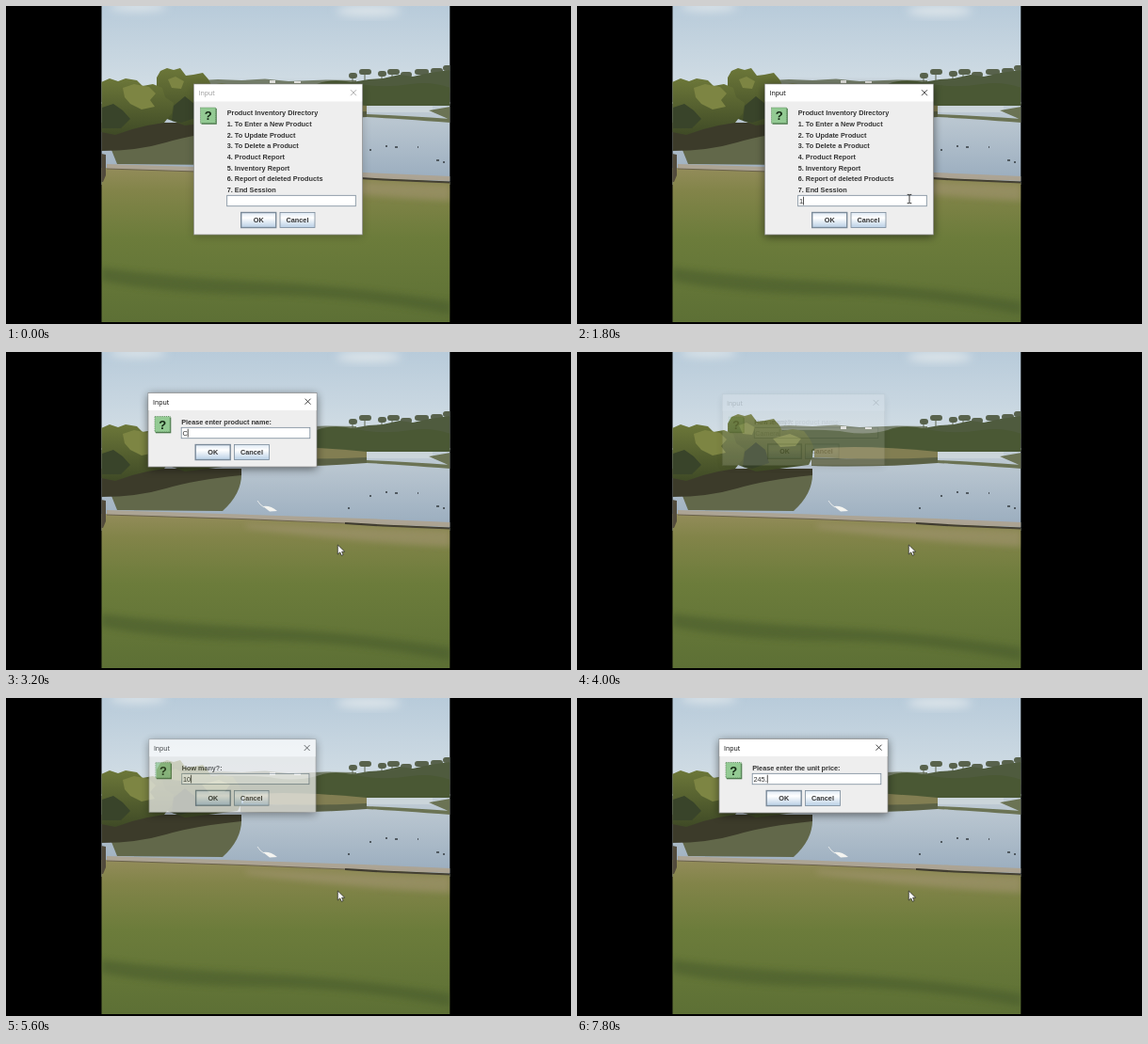
An HTML page that plays this animation: 600 px wide and 338 px high, repeating every 8 s.

```html
<!DOCTYPE html>
<html lang="en">
<head>
<meta charset="utf-8">
<title>Product inventory</title>
<style>
  html, body { margin: 0; width: 100%; height: 100%; overflow: hidden; background: #000; }
  svg { display: block; width: 100%; height: 100%; }
  text { font: bold 7.3px "Liberation Sans", Arial, sans-serif; fill: #333; white-space: pre; }
  text.title { font: 7px "Open Sans", "Noto Sans", sans-serif; fill: #000; }
  text.entry { font: 7.4px "Liberation Sans", Arial, sans-serif; }
  text.mark { font-size: 13px; fill: #142814; }
  .mid { text-anchor: middle; }
  .idle .title { fill: #999; }
  .idle .close { stroke: #999; }
  .idle .shadow { opacity: .22; }
  .close { fill: none; stroke: #111; stroke-width: .8; }
  .shadow { opacity: .55; }
</style>
</head>
<body>
<svg viewBox="0 0 600 338">
  <defs>
    <linearGradient id="sky" x2="0" y2="1">
      <stop stop-color="#b8cbda"/><stop offset=".8" stop-color="#d0dce4"/>
    </linearGradient>
    <linearGradient id="water" x2="0" y2="1">
      <stop stop-color="#c3ced6"/><stop offset="1" stop-color="#98abbd"/>
    </linearGradient>
    <linearGradient id="lawn" x2="0" y2="1">
      <stop stop-color="#938c5a"/><stop offset=".15" stop-color="#828449"/>
      <stop offset=".45" stop-color="#6c7c3b"/><stop offset="1" stop-color="#5d7035"/>
    </linearGradient>
    <linearGradient id="bush" x2="0" y2="1">
      <stop stop-color="#6c7739"/><stop offset="1" stop-color="#3f4a26"/>
    </linearGradient>
    <linearGradient id="metal" x2="0" y2="1">
      <stop stop-color="#dde8f3"/><stop offset=".35" stop-color="#fff"/><stop offset="1" stop-color="#b8cfe5"/>
    </linearGradient>
    <filter id="soft" x="-30%" y="-30%" width="160%" height="160%"><feGaussianBlur stdDeviation="5"/></filter>
    <filter id="blur" x="-10%" y="-30%" width="120%" height="160%"><feGaussianBlur stdDeviation="3"/></filter>
    <clipPath id="frame"><path d="M101.5 0H471.3V336H101.5Z"/></clipPath>
  </defs>
  <g clip-path="url(#frame)">
    <path fill="url(#sky)" d="M101 0H472V104H101Z"/>
    <g fill="#dce4e9" filter="url(#soft)">
      <ellipse cx="385" cy="5" rx="34" ry="6"/><ellipse cx="140" cy="1" rx="30" ry="5"/>
    </g>
    <path fill="url(#water)" d="M101 102H472V190H101Z"/>
    <!-- far shore and palms -->
    <path fill="#77816c" d="M190 80L225 78 250 79 275 77.5 300 80 340 78.5 372 79V90H190Z"/>
    <path fill="#e6e6e1" d="M280 79h6v3h-6ZM306 80h7v2h-7Z"/>
    <path fill="none" stroke="#5c6551" stroke-width="1" d="M368 73V82M381 69V82M399 72V82M410 68V82"/>
    <path fill="none" stroke="#58624c" stroke-width="6" stroke-linecap="round"
      d="M367 74h3M378 70h7M398 72h3M408 70h7M422 73h6M437 70h9M454 69h7M467 66h4"/>
    <path fill="#4f5b3e" d="M362 82L385 78 400 77 418 73 432 75 450 71 472 68V92H362Z"/>
    <path fill="#4a5834" d="M190 84Q262 81 285 85T330 83Q347 76 372 82T430 83Q452 80 472 87V106H330L190 104Z"/>
    <path fill="#cbd5da" d="M383 106H453V113H383Z"/>
    <path fill="#827e52" d="M252 103Q300 98 383 106V114Q320 116 252 112Z"/>
    <path fill="#5b6145" d="M249 112Q320 115 383 112V118Q320 123 249 121Z"/>
    <path fill="#6b7354" d="M383 115Q430 117 472 120V124Q420 120 383 118ZM449 111L472 107V121Z"/>
    <!-- left thicket and its reflection -->
    <path fill="#62684a" d="M112 153L250 128Q251 150 230 169L118 168Z"/>
    <path fill="#3c3b2a" d="M101 124H250V131Q200 136 170 145T101 154Z"/>
    <path fill="url(#bush)" d="M160 76L164 69 171 66 178 68 185 66 191 74 199 73 209 71 215 78 218 84 229 82 241 84 247 92 251 100 250 112 246 120 215 124 190 127 160 116Z"/>
    <path fill="url(#bush)" d="M101 81L110 77 119 80 127 77 139 79 145 85 156 83 166 87 169 97 178 103 176 114 168 124 150 127 134 131 116 137 101 134Z"/>
    <path fill="#7d8543" d="M124 87L136 83 152 86 159 93 153 100 158 107 144 110 132 104 126 97ZM172 78L180 75 189 80 186 88 176 87ZM208 92L226 87 238 92 232 100 216 101Z"/>
    <path fill="#39442a" d="M102 108L114 104 124 111 132 120 122 130 102 130ZM178 106L190 96 200 104 204 118 186 124 176 122Z"/>
    <!-- sea wall and lawn -->
    <path fill="url(#lawn)" d="M101 172L250 176 380 182 472 187V336H101Z"/>
    <path fill="#aca494" d="M107 168L260 173 380 177 472 181V186L380 183 260 178 107 173Z"/>
    <path fill="none" stroke="#69614b" d="M107 173L250 177.5 360 182"/>
    <path fill="none" stroke="#38352b" stroke-width="2" d="M360 182L400 184.5 472 187.5"/>
    <path fill="#a19471" opacity=".6" filter="url(#blur)" d="M255 183L472 190V207Q380 203 255 187Z"/>
    <path fill="#44582a" opacity=".5" filter="url(#blur)" d="M101 278Q180 289 270 293T472 314V328Q370 308 270 307T101 292Z"/>
    <path fill="#524b3c" d="M101 157L106 158V180L103 187H101Z"/>
    <!-- birds -->
    <path fill="none" stroke="#f4f4f0" stroke-width=".8" d="M267 158L270 162 274 165"/>
    <path fill="#f4f4f0" d="M273 164Q281 163 288 169L280 169.5Z"/>
    <path fill="none" stroke="#343b40" stroke-width="1.6" d="M403 149h2M413 150h3M386 153h2M457 164h3M464 166h2M363 166h2M437 150h1"/>
  </g>
  <g id="dialogs"></g>
  <g id="arrow"><path fill="#fff" stroke="#222" stroke-width=".7" d="M0 0V10L2.4 7.8 4 11.3 5.8 10.5 4.3 7.2H7.4Z"/></g>
  <g id="beam"><path fill="none" stroke="#222" stroke-width=".9" d="M-2.3 -4.6H-.5L0 -4 .5 -4.6H2.3M0 -4V4M-2.3 4.6H-.5L0 4 .5 4.6H2.3"/></g>
</svg>
<script>
const LOOP = 8000, STEP = 100;
const OPEN_DELAY = 120, OPEN_TIME = 250, CLOSE_TIME = 150;
const find = id => document.getElementById(id);
const clamp = v => Math.max(0, Math.min(1, v));

const menu = ["Product Inventory Directory", "1. To Enter a New Product", "2. To Update Product",
  "3. To Delete a Product", "4. Product Report", "5. Inventory Report",
  "6. Report of deleted Products", "7. End Session"];

// start: when the previous window begins to leave; blink: first caret; keys: times of typed letters
const dialogs = [
  { x: 199.5, y: 83, lines: menu, start: -1000, end: 2060, blink: 1200, entry: "1", keys: [1800] },
  { x: 151, y: 43.5, lines: ["Please enter product name:"], start: 2060, end: 3860, blink: 2200,
    entry: "Camera", keys: [3200, 3300, 3400, 3600, 3700, 3800] },
  { x: 151, y: 43.5, lines: ["How many?:"], start: 3860, end: 5560, blink: 4100, entry: "10", keys: [5300, 5400] },
  { x: 151, y: 43.5, lines: ["Please enter the unit price:"], start: 5560, end: 9000, blink: 5800,
    entry: "245.", keys: [7100, 7300, 7500, 7800] }
];

const button = (x, y, label, line) =>
  `<rect x="${x}" y="${y}" width="37" height="16" fill="url(#metal)" stroke="#7a8a99" stroke-width="${line}"/>
   <text class="mid" x="${x + 18.5}" y="${y + 10.7}">${label}</text>`;

function build(d) {
  const rows = d.lines.length * 11.64, field = 25.4 + rows;
  d.height = 66.9 + rows;
  const g = document.createElementNS("http://www.w3.org/2000/svg", "g");
  g.innerHTML = `
    <rect class="shadow" y="2" width="179" height="${d.height}" filter="url(#soft)"/>
    <rect width="179" height="${d.height}" fill="#eee" stroke="#8c8c8c" stroke-width=".7"/>
    <path fill="#fff" d="M.4 .4H178.6V18.5H.4Z"/>
    <text class="title" x="5" y="12.1">Input</text>
    <path class="close" d="M166.5 6.2l6 6m0 -6l-6 6"/>
    <path fill="#4f7a4f" d="M8 26H24.3V42.8H8Z"/>
    <path fill="#93ca93" stroke="#568256" stroke-width=".8" stroke-dasharray="1 1" d="M7 25H23.2V41.5H7Z"/>
    <text class="mark mid" x="15.2" y="38.2">?</text>
    ${d.lines.map((s, i) => `<text x="35.2" y="${33.3 + i * 11.64}">${s}</text>`).join("")}
    <rect x="35.2" y="${field - .2}" width="136.6" height="11.4" fill="#fff" stroke="#7a8a99" stroke-width=".8"/>
    <text class="entry" x="36.4" y="${field + 8.6}"></text>
    <path class="caret" stroke="#222" stroke-width=".8" d="M0 ${field + 1.2}v8.8"/>
    ${button(50.2, field + 18, "OK", 1.4)}${button(91.5, field + 18, "Cancel", .8)}`;
  find("dialogs").append(g);
  d.node = g;
  d.text = g.querySelector(".entry");
  d.caret = g.querySelector(".caret");
}

function drawDialog(d, t) {
  const shown = clamp((t - d.start - OPEN_DELAY) / OPEN_TIME) * (1 - clamp((t - d.end) / CLOSE_TIME));
  const scale = .96 + .04 * shown, cx = 89.5, cy = d.height / 2;
  d.node.setAttribute("opacity", shown);
  d.node.setAttribute("transform",
    `translate(${d.x + cx} ${d.y + cy}) scale(${scale}) translate(${-cx} ${-cy})`);
  d.node.classList.toggle("idle", t < 1200);

  const typed = d.keys.filter(k => k <= t).length;
  d.text.textContent = d.entry.slice(0, typed);
  const blinkOn = t >= d.blink && Math.floor((t - d.blink) / 500) % 2 === 0;
  const width = typed ? d.text.getComputedTextLength() : 0;
  d.caret.setAttribute("opacity", typed || blinkOn ? 1 : 0);
  d.caret.setAttribute("transform", `translate(${36.9 + width} 0)`);
}

const path = [[700, 452, 314], [800, 405, 235], [900, 357, 153], [1100, 354, 184], [1200, 353, 205], [2100, 352.3, 205]];

function drawPointer(t) {
  const spot = path.filter(p => p[0] <= t).pop();
  const overField = t >= 1200 && t < 2100;
  for (const [id, on] of [["arrow", spot && !overField], ["beam", overField]]) {
    find(id).setAttribute("opacity", on ? 1 : 0);
    if (spot) find(id).setAttribute("transform", `translate(${spot[1]} ${spot[2]})`);
  }
}

function draw(now) {
  const t = Math.floor(now % LOOP / STEP) * STEP;
  dialogs.forEach(d => drawDialog(d, t));
  drawPointer(t);
}

dialogs.forEach(build);
const began = performance.now();
const tick = () => {
  draw(performance.now() - began);
  requestAnimationFrame(tick);
};
tick();
</script>
</body>
</html>
```
